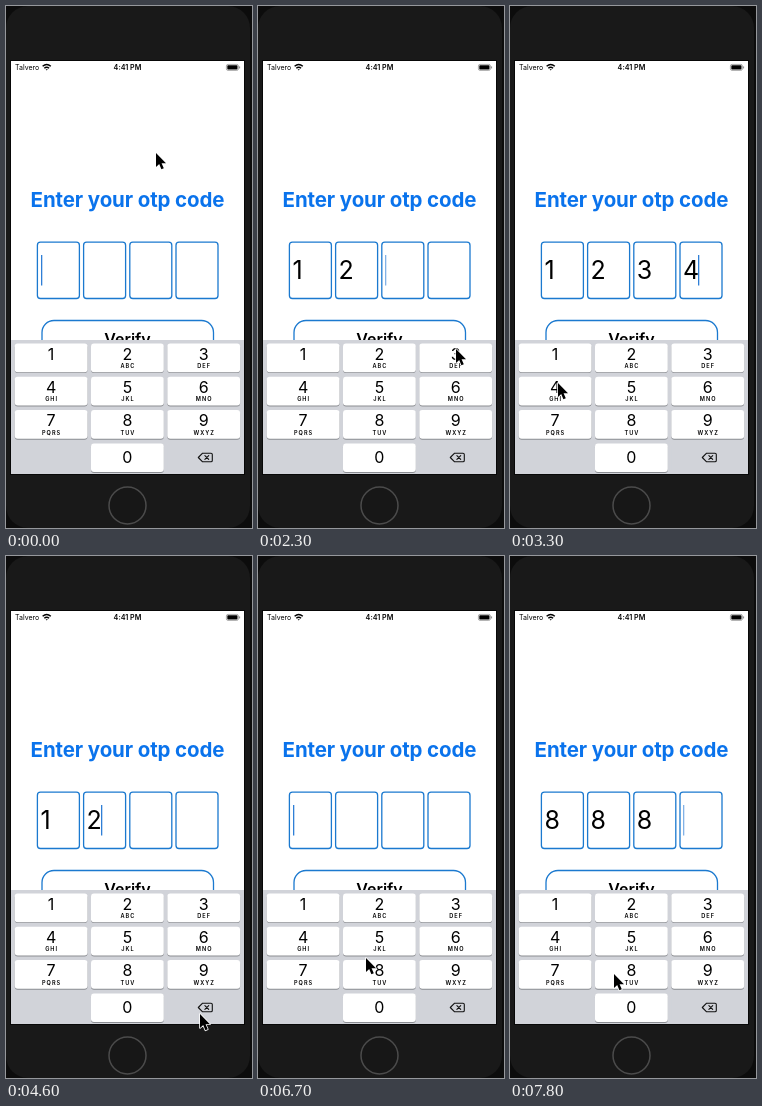
These frames come from a looping animation (246x522 px, 8 s). An HTML page:

```html
<!DOCTYPE html>
<html lang="en">
<head>
<meta charset="utf-8">
<title>OTP entry</title>
<style>
html, body { margin: 0; width: 100%; height: 100%; overflow: hidden; background: #0c0c0c; }
svg { display: block; width: 246px; height: 522px; font-family: Inter, Roboto, sans-serif; }
.mid { text-anchor: middle; }
.title { font-size: 20.5px; font-weight: 700; letter-spacing: -.12px; fill: #0a73ec; }
.outline { fill: #fff; stroke: #1b79cf; stroke-width: 1.3; }
.digit { font-size: 25px; opacity: 0; }
.num { font-size: 16px; }
.abc { font-size: 5.6px; font-weight: 600; letter-spacing: 1px; }
.key { fill: #fff; }
.digit, .key, .del { animation: 8s step-end infinite; }
.del { fill: #d1d3d9; animation-name: del; }
.caret { fill: #2f7fd6; animation: caret 8s step-end infinite, blink 8s linear infinite; }
.cursor { animation: cursor 8s ease-in-out infinite; }

/* 1% = 80 ms */
@keyframes one   { 0% { opacity: 0 } 18.75% { opacity: 1 } 67.5%, 100% { opacity: 0 } }
@keyframes two   { 0% { opacity: 0 } 26.25% { opacity: 1 } 60%, 100% { opacity: 0 } }
@keyframes three { 0% { opacity: 0 } 32.5% { opacity: 1 } 57.5%, 100% { opacity: 0 } }
@keyframes four  { 0% { opacity: 0 } 40% { opacity: 1 } 55%, 100% { opacity: 0 } }
@keyframes eightA { 0% { opacity: 0 } 87.5%, 100% { opacity: 1 } }
@keyframes eightB { 0% { opacity: 0 } 91.25%, 100% { opacity: 1 } }
@keyframes eightC { 0% { opacity: 0 } 96.25%, 100% { opacity: 1 } }

@keyframes key1 { 17.5% { fill: #b6bac3 } 0%, 20%, 100% { fill: #fff } }
@keyframes key2 { 25% { fill: #b6bac3 } 0%, 27.5%, 100% { fill: #fff } }
@keyframes key3 { 31.25% { fill: #b6bac3 } 0%, 33.75%, 100% { fill: #fff } }
@keyframes key4 { 38.75% { fill: #b6bac3 } 0%, 41.25%, 100% { fill: #fff } }
@keyframes key8 {
  86.25%, 90%, 95% { fill: #b6bac3 }
  0%, 87.5%, 91.25%, 96.25%, 100% { fill: #fff }
}
@keyframes del {
  53.75%, 56.25%, 58.75%, 66.25% { fill: #fff }
  0%, 55%, 57.5%, 60%, 67.5%, 100% { fill: #d1d3d9 }
}

@keyframes caret {
  0%, 67.5% { transform: translateX(35px) }
  18.75%, 87.5% { transform: translateX(81px) }
  26.25%, 91.25% { transform: translateX(127px) }
  32.5%, 96.25%, 100% { transform: translateX(173px) }
  40% { transform: translateX(188px) }
  55% { transform: translateX(142px) }
  57.5% { transform: translateX(95px) }
  60% { transform: translateX(47.5px) }
}
@keyframes blink {
  0%, 1.25%, 6.25%, 12.5%, 18.75%, 26.25%, 32.5%, 43.75%, 48.75%, 68.75%,
  73.75%, 77.5%, 82.5%, 95% { opacity: 1 }
  2.5%, 5%, 15%, 17.5%, 45%, 47.5%, 70%, 72.5%, 78.75%, 81.25% { opacity: 0 }
  28.75%, 31.25%, 97.5%, 100% { opacity: .6 }
}
@keyframes cursor {
  0%, 1.25% { transform: translate(150px, 147px) }
  11.25%, 12.5% { transform: translate(59px, 358px) }
  15%, 18.75% { transform: translate(58px, 357px) }
  21.25%, 25.6% { transform: translate(119px, 349px) }
  28.75%, 33.75% { transform: translate(198px, 343px) }
  39.4%, 42.5% { transform: translate(48px, 377px) }
  50%, 53.75% { transform: translate(193px, 457px) }
  57.5%, 67.5% { transform: translate(194px, 458px) }
  71.25% { transform: translate(204px, 470px) }
  76.25% { transform: translate(193px, 420px) }
  82.5%, 83.75% { transform: translate(108px, 402px) }
  87.5% { transform: translate(105px, 416px) }
  97.5%, 100% { transform: translate(104px, 418px) }
}
</style>
</head>
<body>
<svg viewBox="0 0 246 522">
  <rect x="0" y="0" width="244" height="522" rx="22" fill="#191919"/>
  <rect x="4" y="54" width="235" height="415" fill="#080808"/>
  <rect x="5" y="55" width="233" height="413" fill="#fff"/>
  <circle cx="121.5" cy="499.5" r="18.5" fill="#171717" stroke="#4b4b4b" stroke-width="1.5"/>

  <text x="9" y="64" font-size="7">Talvero</text>
  <g fill="none" stroke="#000" stroke-width="1.4">
    <path d="M36.6 60.3Q40.7 56.7 44.8 60.3M38.3 62.2Q40.7 60.2 43.1 62.2"/>
    <path d="M39.6 63.2H41.8L40.7 64.4Z" fill="#000" stroke="none"/>
  </g>
  <text class="mid" x="121.5" y="64" font-size="7.2" font-weight="600">4:41 PM</text>
  <rect x="220.4" y="58.4" width="12" height="6" rx="1.6" fill="none" stroke="#888" stroke-width=".7"/>
  <rect x="221.3" y="59.3" width="10.2" height="4.2" rx=".8"/>
  <rect x="233.1" y="60.3" width="1" height="2.2" rx=".5" fill="#888"/>

  <text class="mid title" x="121.5" y="201">Enter your otp code</text>
  <g id="boxes"></g>
  <g id="digits"></g>
  <rect class="caret" y="249" width="1.3" height="30.5"/>

  <rect class="outline" x="36" y="314.5" width="171.5" height="38" rx="12"/>
  <text class="mid" x="121.5" y="339" font-size="16" font-weight="600">Verify</text>

  <rect x="5" y="334" width="233" height="134" fill="#d1d3d9"/>
  <g id="pad"></g>
  <rect class="del" x="161.3" y="437.5" width="73.5" height="28.7" rx="3"/>
  <g fill="none" stroke="#111" stroke-width="1.1" stroke-linejoin="round" stroke-linecap="round">
    <path d="M192.3 451.5L196.6 447.2H205Q206.3 447.2 206.3 448.5V454.5Q206.3 455.8 205 455.8H196.6Z"/>
    <path d="M198.9 449.6L202.7 453.4M202.7 449.6L198.9 453.4"/>
  </g>

  <path class="cursor" d="M0 0V14L3.2 11.1L5.4 16.3L7.8 15.2L5.6 10.2H10Z"
        stroke="#fff" stroke-width="1.6" stroke-linejoin="round" paint-order="stroke"/>
</svg>
<script>
const add = (id, markup) => document.getElementById(id).insertAdjacentHTML('beforeend', markup);
const boxX = i => 31.4 + i * 46.2;

for (let i = 0; i < 4; i++)
  add('boxes', `<rect class="outline" x="${boxX(i)}" y="236.2" width="42" height="56.3" rx="3"/>`);

const entries = [[0, 1, 'one'], [1, 2, 'two'], [2, 3, 'three'], [3, 4, 'four'],
  [0, 8, 'eightA'], [1, 8, 'eightB'], [2, 8, 'eightC']];
for (const [i, digit, name] of entries)
  add('digits', `<text class="digit" x="${boxX(i) + 3}" y="273" style="animation-name:${name}">${digit}</text>`);

function addKey(n, col, row, letters) {
  const x = 8.7 + col * 76.3, y = 337.5 + row * 33.3, mid = x + 36.4;
  add('pad', `<rect x="${x}" y="${y + .9}" width="72.8" height="28.7" rx="3" fill="#8b8d92"/>
    <rect class="key" x="${x}" y="${y}" width="72.8" height="28.7" rx="3" style="animation-name:key${n}"/>
    <text class="mid num" x="${mid}" y="${y + (n ? 16.3 : 20)}">${n}</text>
    <text class="mid abc" x="${mid + .5}" y="${y + 24.6}">${letters}</text>`);
}
['', 'ABC', 'DEF', 'GHI', 'JKL', 'MNO', 'PQRS', 'TUV', 'WXYZ'].forEach((letters, i) =>
  addKey(i + 1, i % 3, Math.floor(i / 3), letters));
addKey(0, 1, 3, '');
</script>
</body>
</html>
```
